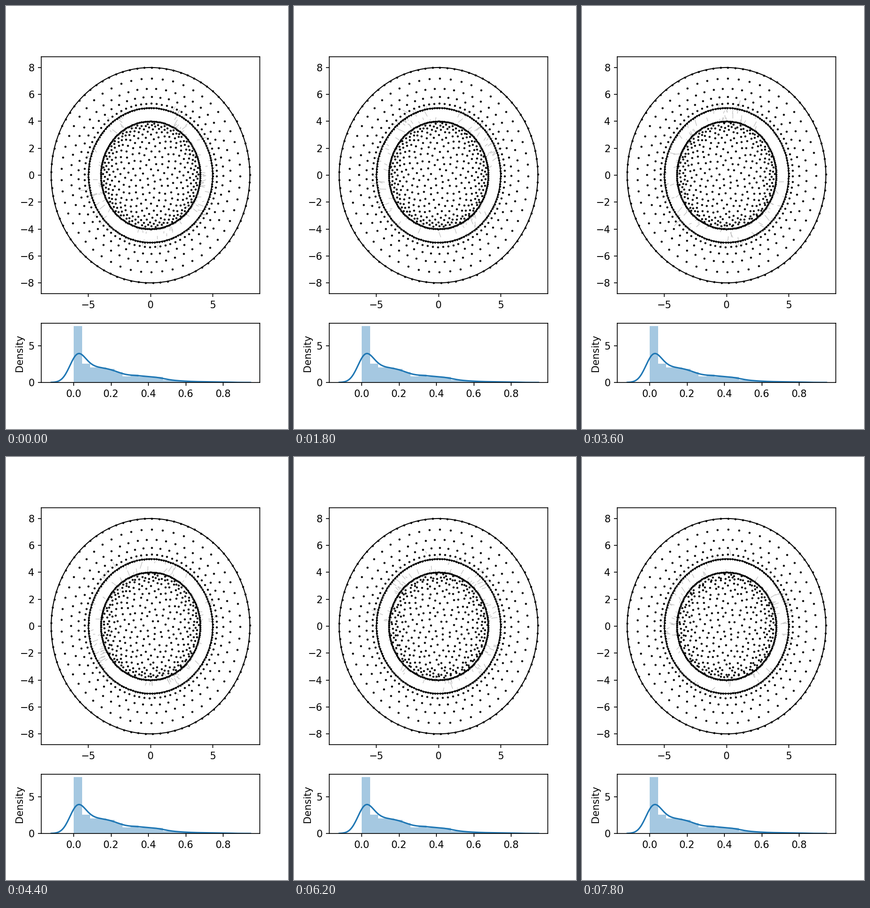
These frames come from a looping animation (600 px wide and 900 px high, 8000 ms). A matplotlib script:

```python
import numpy as np
import matplotlib.pyplot as plt
from matplotlib.animation import FuncAnimation
from matplotlib.collections import LineCollection

FRAMES, STEP_MS = 40, 200
TAU = 2 * np.pi
BLUE = "#1f77b4"


def polar(r, a):
    """Points at radius r and clockwise angle a from the top."""
    return np.column_stack([r * np.sin(a), r * np.cos(a)])


def ring(r, count, phase, skew=0.0):
    turn = TAU * np.arange(count) / count
    return polar(np.full(count, r), phase + turn + skew * np.sin(turn / 2))


def disc(radius):
    """Sunflower packing that gets denser toward the rim."""
    r = np.linspace(0, radius - 0.13, 2000)
    gap = 0.18 + 0.38 * (1 - (r / radius) ** 4)
    total = np.cumsum(TAU * r / (0.87 * gap ** 2)) * (r[1] - r[0])
    n = np.arange(int(total[-1])) + 0.5
    rad = np.interp(n, total, r)
    return polar(rad, n * np.pi * (3 - np.sqrt(5)) + 0.4)


def whiskers(i):
    """Short, mostly radial strokes around the gap between the inner circles."""
    rng = np.random.default_rng(700 + i)
    n = 115
    hubs = rng.uniform(0, TAU, 26)
    a = rng.choice(hubs, n) + rng.normal(0, 0.13, n)
    inner = rng.random(n) < 0.5
    mid = np.where(inner, rng.normal(4.15, 0.2, n), rng.normal(4.95, 0.25, n))
    size = rng.uniform(0.15, 0.55, n)
    tilt = 0.25 * np.sin(3 * a + rng.uniform(0, TAU)) + rng.normal(0, 0.2, n)
    center = polar(mid, a)
    half = polar(size / 2, a + tilt)
    return np.stack([center - half, center + half], axis=1)


rng = np.random.default_rng(4)
seeds = disc(4)
seeds += rng.normal(0, 0.012, seeds.shape)
sway = rng.uniform(0, TAU, seeds.shape)
fade = np.clip(1 - (np.hypot(*seeds.T) / 4) ** 2, 0, 1)[:, None]

shells = np.vstack([
    ring(8, 85, 0.012),
    ring(7.2, 53, 0.013, 0.036),
    ring(6.43, 53, -0.05, 0.036),
    ring(5.83, 53, 0.013, 0.036),
    ring(5.33, 80, 0.013),
    ring(5, 160, 0.013),
    ring(4, 170, 0.0),
])
shell_r = np.hypot(*shells.T)
shell_a = np.arctan2(shells[:, 0], shells[:, 1])


def dots(i):
    t = i / (FRAMES - 1)
    drift = np.array([0.11, -0.09]) * t * fade
    wobble = 0.04 * (np.sin(sway + 3 * t) - np.sin(sway))
    turn = 0.004 * np.sin(2 * shell_a + 1) * t
    return np.vstack([polar(shell_r, shell_a + turn), seeds + drift + wobble])


fig, (ax, low) = plt.subplots(
    2, 1, figsize=(4, 6), dpi=150,
    gridspec_kw=dict(height_ratios=[4, 1], hspace=0.2,
                     left=0.125, right=0.9, bottom=0.11, top=0.88))

# Point field
ax.set(xlim=(-8.8, 8.8), ylim=(-8.8, 8.8),
       xticks=[-5, 0, 5], yticks=range(-8, 9, 2))
strokes = LineCollection([], colors="0.75", linewidths=0.6, zorder=1)
ax.add_collection(strokes)
around = np.linspace(0, TAU, 300)
for radius in (4, 5, 8):
    ax.plot(*polar(radius, around).T, "k", lw=1)
points, = ax.plot([], [], "k.", ms=2.2, zorder=3)

# Histogram with a Gaussian density estimate
heights = np.array([7.69, 2.55, 2.05, 2.03, 1.87, 1.4, 0.83, 1.1, 0.8, 0.8,
                    0.75, 0.35, 0.25, 0.2, 0.12, 0.1, 0.1, 0.05, 0.1])
width, band = 0.0434, 0.041
left = 0.001 + width * np.arange(len(heights))
low.bar(left, heights, width, align="edge", color=BLUE, alpha=0.4)
x = np.linspace(-0.12, 0.946, 250)
middle = left + width / 2
middle[0] = 0.0165  # most of the first bin lies close to zero
z = (x[:, None] - middle) / band
kernel = np.exp(-z ** 2 / 2) / (band * np.sqrt(TAU))
low.plot(x, kernel @ (heights * width), color=BLUE, lw=1.5)
low.set(xlim=(-0.1736, 0.9962), ylim=(0, 8.075), yticks=[0, 5],
        xticks=[0, 0.2, 0.4, 0.6, 0.8], ylabel="Density")


def draw(i):
    points.set_data(*dots(i).T)
    strokes.set_segments(whiskers(i))
    return points, strokes


anim = FuncAnimation(fig, draw, frames=FRAMES, interval=STEP_MS,
                     init_func=lambda: draw(0), repeat=True, repeat_delay=0)
plt.show()
```
